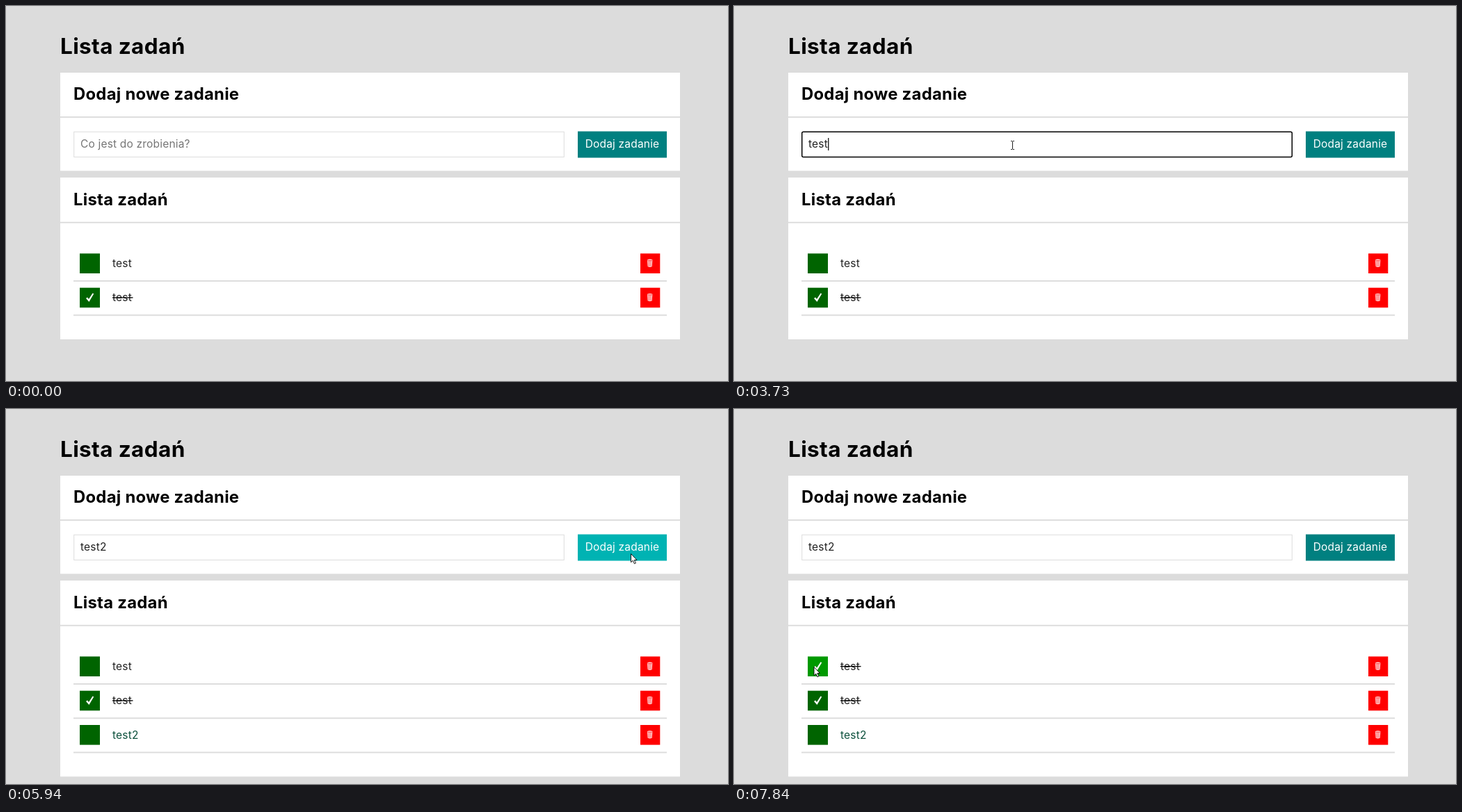
Write an HTML page that moves like this. It is 1038 px wide and 540 px high and loops after 8 s.

```html
<!DOCTYPE html>
<html lang="pl">
<head>
<meta charset="utf-8">
<title>Lista zadań</title>
<style>
  html, body { margin: 0; width: 100%; height: 100%; overflow: hidden; background: #dcdcdc; }
  svg { display: block; font: 15.5px Inter, sans-serif; letter-spacing: .012em; }
  .title, .heading { font-weight: 650; letter-spacing: .012em; }
  .title { font-size: 31.5px; }
  .heading { font-size: 23.8px; }
  .card { fill: #fff; }
  .line { fill: #dcdcdc; }
  .task { fill: #222; }
  g:last-child > .task { fill: #0d513d; }
</style>
</head>
<body>
<svg width="1038" height="540" viewBox="0 0 1038 540">
  <defs>
    <path id="check" d="M115 421l2-1.6 2 2.6 5.6-8.4 1.6.9-6.8 11.6z" fill="#fff"/>
    <g id="bin">
      <path d="M922 365.4q3.7-1.6 7.4 0l-.7 9.8q-3 1.4-6 0z" fill="#fff" fill-opacity=".85"/>
      <path d="M922.5 366.6h6.4M924.4 367v8M927 367v8" fill="none" stroke="#f00" stroke-width=".7"/>
    </g>
  </defs>

  <text class="title" x="78" y="69">Lista zadań</text>
  <rect class="card" x="78" y="96" width="891" height="141.3"/>
  <rect class="line" x="78" y="159" width="891" height="1.9"/>
  <text class="heading" x="97" y="135">Dodaj nowe zadanie</text>
  <rect id="field" x="97.7" y="181.2" width="704.6" height="36.2" fill="#fff"/>
  <text id="entry" x="107" y="204"></text>
  <rect id="caret" y="190" width="1.2" height="18"/>
  <rect id="button" x="822" y="180.5" width="128" height="38"/>
  <text x="886" y="204" fill="#fff" text-anchor="middle">Dodaj zadanie</text>

  <rect id="list" class="card" x="78" y="247" width="891"/>
  <rect class="line" x="78" y="310.8" width="891" height="1.9"/>
  <text class="heading" x="97" y="287">Lista zadań</text>
  <g id="rows"></g>

  <path id="arrow" d="M.5 .5V12.7L3.3 10.2 5.4 14.8 7.4 13.9 5.3 9.5H9z" fill="#fff" stroke="#000" stroke-width=".9"/>
  <path id="beam" d="M-2.5-6H-.7L0-5.4.7-6H2.5M0-5.4V5.4M-2.5 6H-.7L0 5.4.7 6H2.5" fill="none" stroke="#222"/>
  <circle id="press" r="11.7" fill="#ff0" fill-opacity=".5"/>
</svg>
<script>
const LOOP = 8000, TICK = 67, BLINK = 525, ROW = 49.3;
const $ = id => document.getElementById(id);
const set = (el, attrs) => { for (const k in attrs) el.setAttribute(k, attrs[k]); };
const show = (el, on) => el.style.display = on ? '' : 'none';
const inside = (p, l, t, r, b) => p.x >= l && p.x < r && p.y >= t && p.y < b;

const focusClick = { down: 1470, up: 1540 };
const addClick = { down: 5810, up: 5940 };
const checkClick = { down: 7710, up: 7840 };
const held = (click, t) => t >= click.down && t < click.up;

const word = 'test2';
const keyTimes = [2600, 2870, 3070, 3270, 4010];

// Each move glides on from where the last one stopped; it begins off stage
const start = { x: 1361, y: 1289 };
const moves = [
  { at: 310, ticks: 3, x: 431, y: 234 },
  { at: 790, ticks: 5, x: 400.5, y: 200.5 },
  { at: 4540, ticks: 9, x: 898, y: 208, lift: 30 },
  { at: 6270, ticks: 3, x: 103.5, y: 208.5 },
  { at: 6760, ticks: 3, x: -28, y: 335 },
  { at: 7090, ticks: 6, x: 114.5, y: 371 }
];

function pointerAt(t) {
  let { x, y } = start;
  for (const m of moves) {
    if (t < m.at) break;
    const k = Math.min(1, (Math.floor((t - m.at) / TICK) + 1) / m.ticks);
    const e = 1 - (1 - k) ** 4;
    x += (m.x - x) * e;
    y += (m.y - y) * e - (m.lift || 0) * Math.sin(Math.PI * e) ** 2;
  }
  return { x, y };
}

function caretVisible(t) {
  const reset = [focusClick.down, ...keyTimes].findLast(time => time <= t);
  return t < addClick.down && Math.floor((t - reset) / BLINK) % 2 == 0;
}

$('rows').innerHTML = ['test', 'test', word].map((name, i) => `
  <g transform="translate(0 ${i * ROW})">
    <rect class="box" x="106" y="356.4" width="29" height="28.6"/>
    <use class="mark" href="#check" y="${-ROW}"/>
    <text class="task" x="153" y="376">${name}</text>
    <rect class="strike" x="153" y="370" width="29.5" height="1.3"/>
    <rect x="912" y="356.4" width="28.3" height="28.6" fill="#f00"/>
    <use href="#bin"/>
    <rect class="line" x="97" y="395" width="853" height="1.9"/>
  </g>`).join('');
const rows = [...$('rows').children];

function draw(t) {
  const p = pointerAt(t);
  const pressed = [focusClick, addClick, checkClick].some(click => held(click, t));
  const focused = t >= focusClick.down && t < addClick.down;
  const added = t >= addClick.up;
  const shade = (over, idle, hover, active) => !over ? idle : pressed ? active : hover;

  set($('field'), focused
    ? { rx: 2, stroke: '#000', 'stroke-width': 1.5 }
    : { rx: 0, stroke: '#dcdcdc', 'stroke-width': 1 });

  const typed = word.slice(0, keyTimes.filter(time => time <= t).length);
  $('entry').textContent = typed || 'Co jest do zrobienia?';
  set($('entry'), { fill: typed ? '#222' : '#757575' });
  set($('caret'), { x: 107.2 + (typed && $('entry').getComputedTextLength()) * 1 });
  show($('caret'), caretVisible(t));

  set($('button'), { fill: shade(inside(p, 822, 180, 950, 218), '#008080', '#00b3b3', '#00e6e6') });
  set($('list'), { height: 233 + (added ? ROW : 0) });

  rows.forEach((row, i) => {
    const done = i == 1 || (i == 0 && t >= checkClick.up);
    const top = 356 + i * ROW;
    show(row, i < 2 || added);
    set(row.querySelector('.box'), {
      fill: shade(inside(p, 106, top, 135, top + 29), '#006400', '#009900', '#00cc00')
    });
    show(row.querySelector('.mark'), done);
    show(row.querySelector('.strike'), done);
  });

  const overField = inside(p, 97, 180, 803, 218);
  show($('arrow'), !overField);
  show($('beam'), overField);
  show($('press'), pressed);
  for (const id of ['arrow', 'beam', 'press']) set($(id), { transform: `translate(${p.x} ${p.y})` });
}

function tick() {
  draw(performance.now() % LOOP);
  requestAnimationFrame(tick);
}
tick();
</script>
</body>
</html>
```
